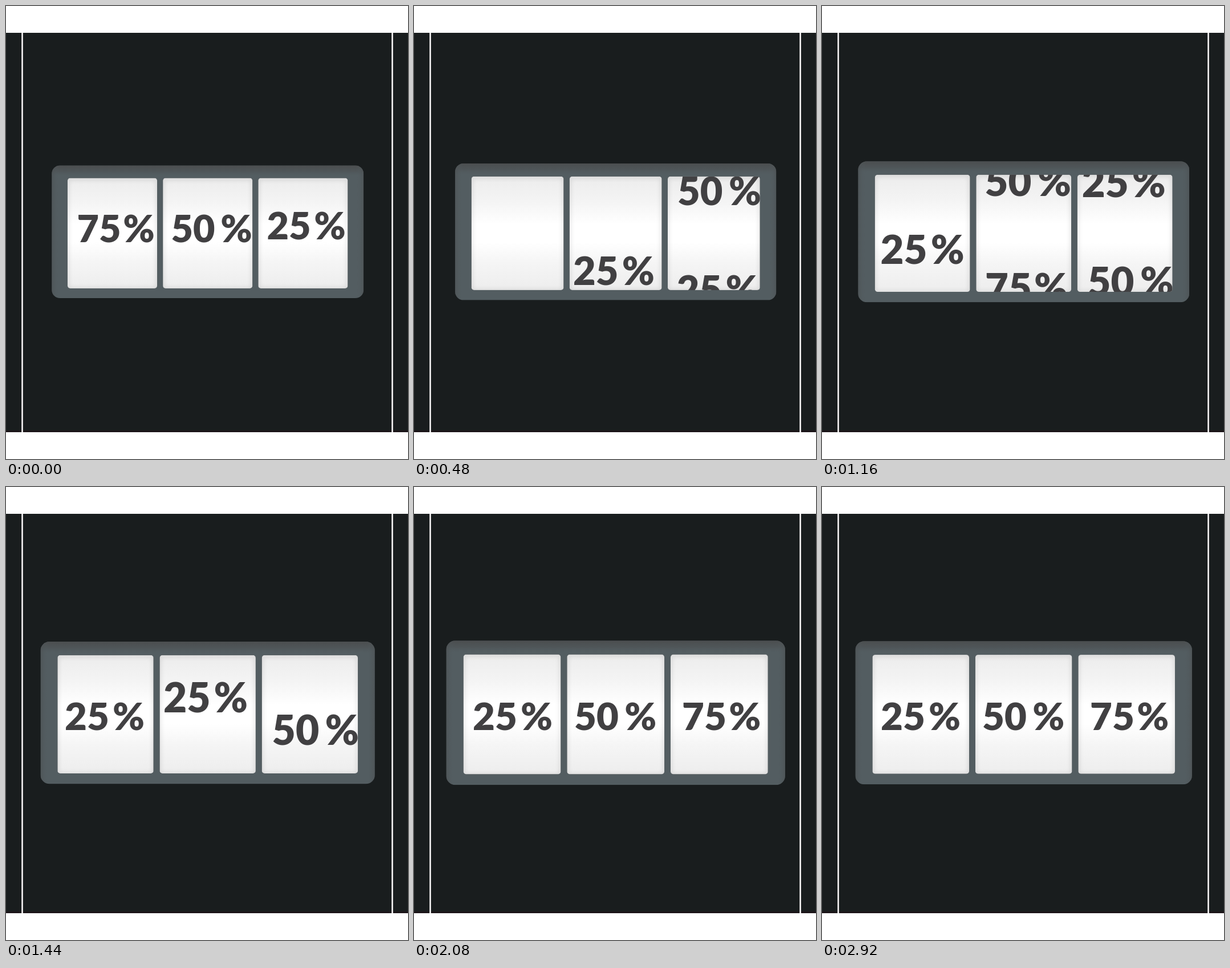
An HTML page with a canvas that plays this animation: 705x794 px, repeating every 2.96 s.

```html
<!DOCTYPE html>
<html lang="en">
<head>
<meta charset="utf-8">
<title>Percent reels</title>
<style>
  html, body { margin: 0; width: 100%; height: 100%; overflow: hidden; background: #fff; }
  canvas { display: block; width: 705px; height: 794px; }
</style>
</head>
<body>
<canvas id="stage" width="705" height="794"></canvas>
<script>
const ctx = document.getElementById('stage').getContext('2d');
const LOOP = 2960, STEP = 40;
const CX = 353.7, CY = 395.75;
const CYCLE = 712, REST_Y = 426, REST_SCALE = 0.925;
const INK = '#414042';
const PANEL = { w: 171.5, top: -102.75, h: 211, lefts: [-268.2, -85.75, 96.7] };

// Ink widths of each label at full scale
const WIDTHS = { 25: 147, 50: 151.5, 75: 145 };
// Order on the repeating strip
const STRIP = [[25, 0], [50, 178], [75, 369]];

// lead: [label, offset] before the strip repeats; keys: [time, distance scrolled]
const REELS = [
  { x: { 25: -256, 50: -247, 75: -248 }, base: 19.9, lead: [[75, 0]], loopAt: 356,
    keys: [[0, 0], [480, 170], [840, 880], [1160, 1030], [1280, 1057]],
    final: 25, restX: 105 },
  { x: { 25: -77, 50: -68, 75: -67.5 }, base: 19.9, lead: [[50, 0], [75, 191]], loopAt: 534,
    keys: [[0, 0], [480, 455], [840, 1334], [1160, 2220], [1640, 2837]],
    final: 50, restX: 283 },
  { x: { 25: 107, 50: 117, 75: 117 }, base: 14.5, loopAt: 1031,
    lead: [[25, 0, 8.5], [50, 183], [25, 366, 8.5], [50, 544], [75, 722]],
    keys: [[0, 0], [480, 247], [840, 900], [1160, 1820], [1760, 3258], [2080, 3520]],
    final: 75, restX: 472 }
];

const mix = (a, b, k) => a + (b - a) * k;
const clamp = v => Math.max(0, Math.min(1, v));

// Smooth curve through the keys that never runs backwards
function travel(keys, t) {
  const n = keys.length - 1;
  if (t >= keys[n][0]) return keys[n][1];
  const slope = i => (keys[i + 1][1] - keys[i][1]) / (keys[i + 1][0] - keys[i][0]);
  const tangent = i => {
    if (i === 0 || i === n) return 0;
    const a = slope(i - 1), b = slope(i);
    return 2 * a * b / (a + b);
  };
  let i = 0;
  while (t >= keys[i + 1][0]) i++;
  const [t0, p0] = keys[i], [t1, p1] = keys[i + 1];
  const d = t1 - t0, u = (t - t0) / d, v = 1 - u;
  return p0 * (1 + 2 * u) * v * v + tangent(i) * d * u * v * v
       + p1 * u * u * (3 - 2 * u) - tangent(i + 1) * d * u * u * v;
}

function frameScale(t) {
  const grow = 1 - Math.min(t / 2680, 1);
  const shrink = Math.max(0, (t - 2800) / 120);
  return (597 - 50 * grow * grow - 6.5 * shrink * shrink) / 597;
}

function roundRect(x, y, w, h, r) {
  ctx.beginPath();
  ctx.roundRect(x, y, w, h, r);
}

function gradient(x0, y0, x1, y1, stops) {
  const g = ctx.createLinearGradient(x0, y0, x1, y1);
  stops.forEach(([at, color]) => g.addColorStop(at, color));
  return g;
}

function drawBackground() {
  ctx.fillStyle = '#fff';
  ctx.fillRect(0, 0, 705, 794);
  ctx.fillStyle = '#191d1e';
  ctx.fillRect(0, 47, 705, 700);
  ctx.fillStyle = '#1c1519';
  ctx.fillRect(0, 744, 705, 3);
  for (const x of [28.5, 677.5]) {
    ctx.fillStyle = '#8a8587';
    ctx.fillRect(x - 1.5, 47, 3, 700);
    ctx.fillStyle = '#fff';
    ctx.fillRect(x - 1, 47, 2, 700);
  }
}

function drawCase(s) {
  const x = CX - 298.5 * s, y = CY - 127 * s, w = 597 * s, h = 254 * s;
  ctx.save();
  roundRect(x, y, w, h, 16 * s);
  ctx.clip();
  ctx.fillStyle = '#535d61';
  ctx.fillRect(x, y, w, h);
  ctx.fillStyle = gradient(0, y, 0, y + 22 * s,
    [[0, 'rgba(74,76,77,.9)'], [0.5, 'rgba(76,80,82,.6)'], [1, 'rgba(83,93,97,0)']]);
  ctx.fillRect(x, y, w, 22 * s);
  const side = [[0, 'rgba(76,80,82,.6)'], [1, 'rgba(83,93,97,0)']];
  ctx.fillStyle = gradient(x, 0, x + 14 * s, 0, side);
  ctx.fillRect(x, y, 14 * s, h);
  ctx.fillStyle = gradient(x + w, 0, x + w - 14 * s, 0, side);
  ctx.fillRect(x + w - 14 * s, y, 14 * s, h);
  ctx.restore();
}

function drawLabel(label, left, baseline, scale) {
  ctx.font = `900 ${72.5 * scale}px Lato, "Open Sans", sans-serif`;
  const digits = String(label);
  const inkLeft = ctx.measureText(digits).actualBoundingBoxLeft;
  const inkRight = ctx.measureText('%').actualBoundingBoxRight;
  ctx.fillText(digits, left + inkLeft, baseline);
  ctx.fillText('%', left + WIDTHS[label] * scale - inkRight, baseline);
}

function drawReel(reel, t, s) {
  const moved = travel(reel.keys, t);
  const stop = reel.keys[reel.keys.length - 1][0];
  const u = clamp((t - stop + 120) / 120), settle = u * u * (3 - 2 * u);

  const put = (label, offset, shift = 0) => {
    const b = reel.base + offset - moved;
    if (b < -115 || b > 170) return;
    const k = label === reel.final && Math.abs(b - 31) < 90 ? settle : 0;
    drawLabel(label, mix(CX + (reel.x[label] + shift) * s, reel.restX, k),
      mix(CY + b * s, REST_Y, k), mix(s, REST_SCALE, k));
  };

  ctx.fillStyle = INK;
  reel.lead.forEach(item => put(...item));
  for (let turn = 0; turn < 5; turn++) {
    STRIP.forEach(([label, at]) => put(label, reel.loopAt + turn * CYCLE + at));
  }
}

function drawPanel(i, t, s) {
  const x = CX + PANEL.lefts[i] * s, y = CY + PANEL.top * s;
  const w = PANEL.w * s, h = PANEL.h * s;
  ctx.save();
  roundRect(x, y, w, h, 5 * s);
  ctx.clip();
  ctx.fillStyle = gradient(0, y, 0, y + h,
    [[0, '#ececec'], [0.22, '#f4f4f4'], [0.42, '#fff'], [0.58, '#fff'], [0.76, '#f5f5f5'], [1, '#ededed']]);
  ctx.fillRect(x, y, w, h);

  ctx.save();
  ctx.shadowColor = 'rgba(0,0,0,.32)';
  ctx.shadowBlur = 9 * s;
  ctx.shadowOffsetY = 1.5 * s;
  ctx.lineWidth = 2;
  ctx.strokeStyle = '#777';
  roundRect(x - 1, y - 1, w + 2, h + 2, 6 * s);
  ctx.stroke();
  ctx.restore();

  drawReel(REELS[i], t, s);
  ctx.restore();
}

function draw(now) {
  const t = Math.floor((now % LOOP) / STEP) * STEP;
  const s = frameScale(t);
  drawBackground();
  drawCase(s);
  REELS.forEach((_, i) => drawPanel(i, t, s));
}

const start = performance.now();
function tick() {
  draw(performance.now() - start);
  requestAnimationFrame(tick);
}
tick();
</script>
</body>
</html>
```
